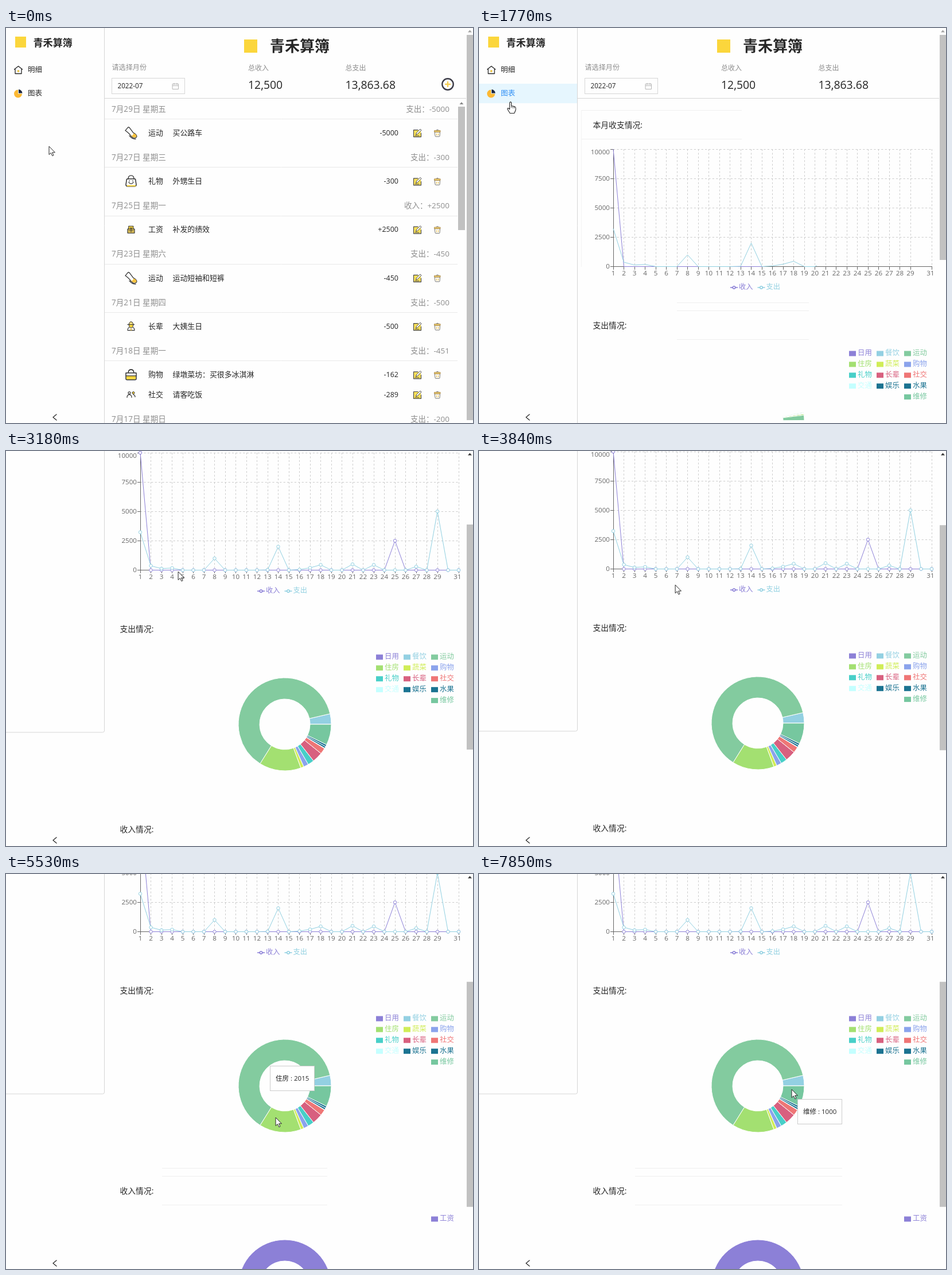
An HTML page with a canvas that plays this animation: 814 px wide and 688 px high, repeating every 8000 ms.

```html
<!DOCTYPE html>
<html lang="zh">
<head>
<meta charset="utf-8">
<style>
html, body { margin: 0; width: 100%; height: 100%; overflow: hidden; background: #fefefe; }
canvas { display: block; }
</style>
</head>
<body>
<canvas id="stage" width="814" height="688"></canvas>
<script>
const ctx = document.getElementById('stage').getContext('2d');
const LOOP = 8000, PAGE_SWITCH = 1290, DRAW = 1500;
const FONT = '"Open Sans","Noto Sans CJK SC","Noto Sans CJK",sans-serif';
const INK = '#262626', GREY = '#8e8e8e', BORDER = '#d6d6d6', YELLOW = '#fbd63c';
const PURPLE = '#8c80d7', SKY = '#91d0e1';
const APP = '青禾算簿';

// ---------- helpers ----------
const clamp = v => Math.max(0, Math.min(1, v));
const mix = (a, b, p) => a + (b - a) * p;

// the CSS "ease" curve
function ease(x) {
  if (x <= 0 || x >= 1) return clamp(x);
  let lo = 0, hi = 1, u = 0;
  for (let i = 0; i < 20; i++) {
    u = (lo + hi) / 2;
    if (.75 * u * (1 - u) + u ** 3 < x) lo = u; else hi = u;
  }
  return .3 * u * (1 - u) ** 2 + 3 * u * u * (1 - u) + u ** 3;
}

// piecewise linear track of [time, ...values]
function track(t, keys) {
  const i = keys.findIndex(k => k[0] > t);
  if (i === 0) return keys[0].slice(1);
  if (i < 0) return keys[keys.length - 1].slice(1);
  const a = keys[i - 1], b = keys[i], p = (t - a[0]) / (b[0] - a[0]);
  return a.slice(1).map((v, j) => mix(v, b[j + 1], p));
}

// y is the visual middle of the line
function text(s, x, y, size, color = INK, align = 'left', weight = 400) {
  ctx.font = `${weight} ${size}px ${FONT}`;
  ctx.fillStyle = color;
  ctx.textAlign = align;
  ctx.fillText(s, x, y + size * .34);
}

function line(x1, y1, x2, y2, color, width = 1, dash = []) {
  ctx.setLineDash(dash);
  ctx.strokeStyle = color;
  ctx.lineWidth = width;
  ctx.beginPath();
  ctx.moveTo(x1, y1);
  ctx.lineTo(x2, y2);
  ctx.stroke();
  ctx.setLineDash([]);
}

function rect(x, y, w, h, color) {
  ctx.fillStyle = color;
  ctx.fillRect(x, y, w, h);
}

// parts: [path, fill, stroke, width]
function draw(x, y, parts) {
  ctx.save();
  ctx.translate(x, y);
  ctx.lineJoin = ctx.lineCap = 'round';
  for (const [d, fill, stroke, width = 1.2] of parts) {
    const p = new Path2D(d);
    if (fill) { ctx.fillStyle = fill; ctx.fill(p); }
    if (stroke) { ctx.strokeStyle = stroke; ctx.lineWidth = width; ctx.stroke(p); }
  }
  ctx.restore();
}

const DARK = '#333';
const icons = {
  home: [['M-7-1L0-6.5L7-1M-5.5-2V6.5H5.5V-2', null, INK, 1.3], ['M-1.5 2A1.5 1.5 0 1 0 1.5 2A1.5 1.5 0 1 0-1.5 2', YELLOW, '#d3a52a', .7]],
  pie: [['M0 0V-7A7 7 0 1 0 7 0Z', '#fdb934'], ['M1-1V-7.5A7 7 0 0 1 7.5-1Z', '#1c2740']],
  sport: [['M-10-4L-5-10Q-3-10-2-8L4 0Q9 2 10 6Q9 10 4 9L0 6Q-2 2-10-4Z', '#fff', DARK, 1.3],
    ['M4 1Q9 2 9.5 6Q9 9 4 8L0 5Q4 5 4 1Z', '#f8c23c'], ['M-3 5Q2 11 8 11', null, DARK, 1.3]],
  gift: [['M-6-4H6Q8-4 8-1L9 6Q9 9 6 9H-6Q-9 9-9 6L-8-1Q-8-4-6-4Z', '#fff', DARK, 1.5], ['M-7 7H8V9H-7Z', YELLOW],
    ['M-5-4Q-5-10 0-10Q5-10 5-4M-4 2Q0 7 4 2M-3-1V0M3-1V0', null, DARK, 1.4]],
  salary: [['M-4-6H4V0H-4Z', YELLOW, DARK, 1], ['M-6-1H6V6H-6Z', '#f0cf5c', DARK, 1.2], ['M-2-4L0-2L2-4M0-2V4M-4 2H4', null, DARK, 1]],
  elder: [['M-6 7Q-6 1 0 1Q6 1 6 7Z', '#fff', DARK, 1.1], ['M-3.5-3V0Q0 5 3.5 0V-3Z', YELLOW, DARK, 1],
    ['M-6-3H6L3.5-4Q3-8 0-8Q-3-8-3.5-4Z', '#f3dd86', DARK, 1], ['M0 4V7', null, '#d5a623', 1.5]],
  shop: [['M-5-2Q-5-9 0-9Q5-9 5-2', null, DARK, 1.6], ['M-9-3H9V7Q9 9 7 9H-7Q-9 9-9 7Z', '#fff', DARK, 1.5],
    ['M-8 2H8V8H-8Z', YELLOW], ['M-9 2H9', null, DARK, 1.2]],
  social: [['M-5-3A2 2 0 1 0-1-3A2 2 0 1 0-5-3M-7 5Q-7 0-3 0Q1 0 1 5', null, DARK, 1.2],
    ['M2-3A2 2 0 1 0 6-3A2 2 0 1 0 2-3', YELLOW, DARK, 1], ['M4 0Q7 1 7 4', null, DARK, 1.2]],
  edit: [['M-6-5H4L6-3V6H-6Z', '#fbe25a'], ['M1-5.5H-6.5V6.5H6.5V0', null, '#444', 1.1],
    ['M-2.5 2.5L-1.5-.5L5-7L7-5L.5 1.5Z', '#fff', '#444', 1], ['M-4 4.5H3', null, '#444', .9]],
  trash: [['M-4.5-2H4.5L4 5Q4 6 3 6H-3Q-4 6-4 5Z', '#fffdf4', '#777', 1], ['M-2-4.5Q-2-6 0-6Q2-6 2-4.5', null, '#777', 1],
    ['M-5-4.5H5V-2H-5Z', '#fbdc7a', '#a07c3c', .9], ['M-1.5 1V3.5M1.5 1V3.5', null, '#e0b445', 1]],
  calendar: [['M-5-4H5V5H-5ZM-5-1H5M-2.5-5.5V-3M2.5-5.5V-3', null, '#b5b5b5', 1]],
  add: [['M-9.7 0A9.7 9.7 0 1 0 9.7 0A9.7 9.7 0 1 0-9.7 0', '#fff', '#3c3c48', 2.4], ['M-4 0H4M0-4V4', null, '#f6cf55', 2.4]],
  collapse: [['M3-5L-3 0L3 5', null, INK, 1.2]],
  arrow: [['M0 0V14L3.3 11L5.8 16.2L8 15.2L5.6 10.3H10Z', '#fff', INK, 1]],
  hand: [['M-1.5 1.5Q0-.8 1.5 1.5V7L7 8.3Q9 9 9 11V14Q8 17 6.5 20H-1L-5 13.5Q-6 11-4 11L-1.5 13Z', '#fff', INK, 1.1],
    ['M1.5 7V10M4 8V11M6.5 8.5V11', null, INK, .8]]
};
const icon = (name, x, y) => draw(x, y, icons[name]);

// ---------- shared frame ----------
function sidebar(t) {
  ctx.strokeStyle = BORDER;
  ctx.lineWidth = 1;
  ctx.beginPath();
  ctx.moveTo(171.5, 0);
  ctx.arcTo(171.5, 698, 168, 698, 3);
  ctx.lineTo(0, 698);
  ctx.stroke();
  rect(16, 15, 19, 19, YELLOW);
  text(APP, 47.5, 26, 17.1, INK, 'left', 700);
  if (t >= 1170) rect(0, 97, 171, 34, '#e6f6fe');
  icon('home', 21.5, 73);
  text('明细', 38, 73, 12.5);
  icon('pie', 21, 114.5);
  text('图表', 38, 114, 12.5, t >= 790 ? '#2f8ff5' : INK);
}

function header() {
  rect(415, 20, 23, 23, YELLOW);
  text(APP, 460, 32.5, 26, INK, 'left', 700);
  text('请选择月份', 184.5, 69, 12.1, GREY);
  ctx.strokeStyle = BORDER;
  ctx.strokeRect(184.5, 87.5, 127, 27);
  text('2022-07', 194.5, 101, 11.7);
  icon('calendar', 295.5, 101.5);
  text('总收入', 422, 70, 12, GREY);
  text('12,500', 422, 99.5, 19.4);
  text('总支出', 591.5, 70, 12, GREY);
  text('13,863.68', 591.5, 99.5, 19.4);
  line(172, 122.5, 802, 122.5, BORDER);
}

function scrollArrow(x, y, color) {
  draw(x, y, [['M-3.5 2L0-2L3.5 2Z', color]]);
}

// ---------- list page ----------
const days = [
  ['7月29日 星期五', '支出：-5000', ['sport', '运动', '买公路车', '-5000']],
  ['7月27日 星期三', '支出：-300', ['gift', '礼物', '外甥生日', '-300']],
  ['7月25日 星期一', '收入：+2500', ['salary', '工资', '补发的绩效', '+2500']],
  ['7月23日 星期六', '支出：-450', ['sport', '运动', '运动短袖和短裤', '-450']],
  ['7月21日 星期四', '支出：-500', ['elder', '长辈', '大姨生日', '-500']],
  ['7月18日 星期一', '支出：-451', ['shop', '购物', '绿墩菜坊：买很多冰淇淋', '-162'], ['social', '社交', '请客吃饭', '-289']],
  ['7月17日 星期日', '支出：-200']
];

function listPage() {
  icon('add', 770, 98);
  let y = 141;
  for (const [date, total, ...items] of days) {
    text(date, 184, y, 13.6, GREY);
    text(total, 773, y, 13.5, GREY, 'right');
    line(172, Math.round(y + 17) + .5, 787, Math.round(y + 17) + .5, '#e9e9e9');
    items.forEach(([kind, name, note, sum], i) => {
      const row = y + 41.6 + i * 34.7;
      icon(kind, 218, row);
      text(name, 248, row, 12.9);
      text(note, 290.5, row, 12.9);
      text(sum, 684, row, 12.5, INK, 'right');
      icon('edit', 717, row + .5);
      icon('trash', 752, row + .5);
    });
    y += 84.25 + Math.max(0, items.length - 1) * 34.7;
  }
  scrollArrow(794, 131, '#8a8a8a');
  rect(788, 137, 12, 215, '#c1c1c1');
}

// ---------- chart page ----------
const spent = { 1: 3230, 2: 370, 3: 130, 4: 180, 8: 1000, 13: 20, 14: 2000, 16: 50, 17: 200, 18: 451, 21: 500, 23: 450, 27: 300, 29: 5000 };
const earned = { 1: 10000, 25: 2500 };
const dayX = d => 234 + (d - 1) * 18.5;
const sumY = v => 415.5 - v * .02045;
const monthDays = Array.from({ length: 31 }, (_, i) => i + 1);

const slices = [
  ['日用', 4, PURPLE], ['餐饮', 500, '#93d0e2'], ['运动', 8654.68, '#83cb9f'], ['住房', 2015, '#a3e071'],
  ['蔬菜', 150, '#d0ed57'], ['购物', 240, '#8ba3ec'], ['礼物', 300, '#48cfc8'], ['长辈', 500, '#d8607f'],
  ['社交', 289, '#ef7676'], ['交通', 20, '#c4ffff'], ['娱乐', 90, '#1b7391'], ['水果', 95, '#1b7391'], ['维修', 1000, '#76c79f']
];
const total = slices.reduce((s, [, v]) => s + v, 0);
const PIE = { x: 486, y: 684, inner: 44, outer: 81 };

function series(data, color, progress) {
  const pts = monthDays.map(d => [dayX(d), sumY(data[d] || 0)]);
  const length = pts.reduce((s, p, i) => i ? s + Math.hypot(p[0] - pts[i - 1][0], p[1] - pts[i - 1][1]) : 0, 0);
  ctx.strokeStyle = color;
  ctx.lineWidth = 1;
  ctx.setLineDash(progress < 1 ? [length * progress, length] : []);
  ctx.beginPath();
  pts.forEach(p => ctx.lineTo(...p));
  ctx.stroke();
  ctx.setLineDash([]);
  if (progress < 1) return;
  ctx.fillStyle = '#fff';
  for (const [x, y] of pts) {
    ctx.beginPath();
    ctx.arc(x, y, 2.7, 0, 7);
    ctx.fill();
    ctx.stroke();
  }
}

function lineKey(x, label, color) {
  line(x, 452, x + 13, 452, color, 1.6);
  ctx.fillStyle = '#fff';
  ctx.beginPath();
  ctx.arc(x + 6.5, 452, 2.2, 0, 7);
  ctx.fill();
  ctx.stroke();
  text(label, x + 15, 451, 12.2, color);
}

function lineChart(t) {
  const dash = [3.2, 3.2];
  for (const v of [2500, 5000, 7500, 10000]) line(234, Math.round(sumY(v)) + .5, 789, Math.round(sumY(v)) + .5, '#ccc', 1, dash);
  for (const d of monthDays) {
    if (d === 30) continue;
    const x = Math.floor(dayX(d)) + .5;
    line(x, 211, x, 415, '#ccc', 1, dash);
    line(x, 415, x, 421, '#666');
    text(d, d === 31 ? 787 : dayX(d), 427, 11.6, '#666', 'center');
  }
  line(234.5, 211, 234.5, 415, '#666');
  line(234, 415.5, 789, 415.5, '#666');
  for (const v of [0, 2500, 5000, 7500, 10000]) {
    const y = Math.round(sumY(v)) + (v ? .5 : -.5);
    line(229, y, 234, y, '#666');
    text(v, 228, v === 10000 ? 216 : y, 11.6, '#666', 'right');
  }
  const progress = ease((t - PAGE_SWITCH) / DRAW);
  series(earned, PURPLE, progress);
  series(spent, SKY, progress);
  lineKey(438, '收入', PURPLE);
  lineKey(485.5, '支出', SKY);
}

function sector(cy, from, to, color) {
  ctx.beginPath();
  ctx.arc(PIE.x, cy, PIE.outer, -from, -to, true);
  ctx.arc(PIE.x, cy, PIE.inner, -to, -from);
  ctx.closePath();
  ctx.fillStyle = color;
  ctx.fill();
  ctx.strokeStyle = '#fff';
  ctx.lineWidth = 1;
  ctx.stroke();
}

function swatch(name, color, col, y) {
  rect(645 + col * 48, y - 3.5, 12, 9, color);
  text(name, 660 + col * 48, y, 12.4, color);
}

function pies(t) {
  const sweep = ease((t - PAGE_SWITCH - 412) / DRAW) * Math.PI * 2;
  if (sweep > 0) {
    let angle = 0;
    for (const [, value, color] of slices) {
      const next = angle + value / total * sweep;
      sector(PIE.y, angle, next, color);
      angle = next;
    }
    sector(PIE.y + 349, 0, sweep, PURPLE);
  }
  slices.forEach(([name, , color], i) => swatch(name, color, i === 12 ? 2 : i % 3, 566 + Math.floor(i / 3) * 18.9));
  swatch('工资', PURPLE, 2, 915);
}

// card outlines are only partly visible
function cardEdges(t) {
  const edge = (x1, x2, ys) => ys.forEach(y => line(x1, y + .5, x2, y + .5, '#efefef'));
  if (t < 2450) {
    edge(178, 458, [143, 193]);
    line(178.5, 143, 178.5, 416, '#f3f3f3');
    edge(345, 575, [478, 492, 542]);
  } else if (t >= 4530) {
    const right = [[7440, 633], [6700, 615], [6190, 580], [5680, 566], [0, 560]].find(([start]) => t >= start)[1];
    edge(272, right, [827, 841, 891]);
  }
}

const hovers = [[4450, 2], [5500, 3], [6120, 4], [6250, 5], [6430, 6], [6700, 7], [7050, 8], [7270, 10], [7400, 12]];

function tooltip(t) {
  if (t < hovers[0][0]) return;
  let x = 185, y = 555, current;
  hovers.forEach(([start, index], i) => {
    if (t < start) return;
    const end = Math.min(t, i + 1 < hovers.length ? hovers[i + 1][0] : LOOP);
    const before = slices.slice(0, index).reduce((s, [, v]) => s + v, 0);
    const angle = (before + slices[index][1] / 2) / total * Math.PI * 2;
    const radius = (PIE.inner + PIE.outer) / 2, p = ease((end - start) / 400);
    x = mix(x, PIE.x + 8.5 + radius * Math.cos(angle), p);
    y = mix(y, PIE.y + 9 - radius * Math.sin(angle), p);
    current = slices[index];
  });
  const label = `${current[0]} : ${current[1]}`;
  ctx.font = `400 11.5px ${FONT}`;
  const width = Math.round(ctx.measureText(label).width + 20);
  x = Math.round(x);
  y = Math.round(y);
  rect(x, y, width, 44, '#fff');
  ctx.strokeStyle = '#ccc';
  ctx.lineWidth = 1;
  ctx.strokeRect(x + .5, y + .5, width - 1, 43);
  text(label, x + 10, y + 22.5, 11.5);
}

function chartPage(t) {
  cardEdges(t);
  text('本月收支情况:', 198.5, 169.5, 13.8);
  text('支出情况:', 198.5, 518.5, 13.8);
  text('收入情况:', 198.5, 867.5, 13.8);
  lineChart(t);
  pies(t);
  tooltip(t);
}

// ---------- timeline ----------
const scrollKeys = [[2450, 0], [2800, 104], [3120, 206], [3180, 208], [3300, 210], [3930, 210], [4110, 315]];
const cursorKeys = [
  [380, 75, 206], [640, 53, 137], [790, 54, 129], [1030, 55, 128], [1950, 55, 128], [2400, 225, 190], [3030, 299, 209],
  [3180, 300, 210], [3430, 320, 218], [3570, 339, 226], [3840, 342, 233], [4120, 364, 264], [4400, 365, 272],
  [5010, 437, 324], [5390, 450, 362], [5530, 470, 424], [6040, 490, 433], [6310, 509, 430], [6570, 520, 427],
  [7180, 536, 407], [7300, 541, 394], [7440, 544, 381], [7700, 543, 377], [7850, 545, 375]
];

function render(t) {
  const charts = t >= PAGE_SWITCH;
  const scroll = Math.round(track(t, scrollKeys)[0]);
  rect(0, 0, 814, 688, '#fefefe');
  ctx.save();
  ctx.translate(0, -scroll);
  sidebar(t);
  header();
  if (charts) chartPage(t); else listPage();
  ctx.restore();
  icon('collapse', 85, 678);
  scrollArrow(808.5, 5.5, scroll ? '#333' : '#a3a3a3');
  rect(803, 12 + scroll * .558, 11, charts ? 392 : 671, '#c1c1c1');
  const [x, y] = track(t, cursorKeys);
  icon(t >= 760 && t < 2030 ? 'hand' : 'arrow', x, y + .5);
}

const begin = performance.now();
function tick() {
  render((performance.now() - begin) % LOOP);
  requestAnimationFrame(tick);
}
tick();
</script>
</body>
</html>
```
